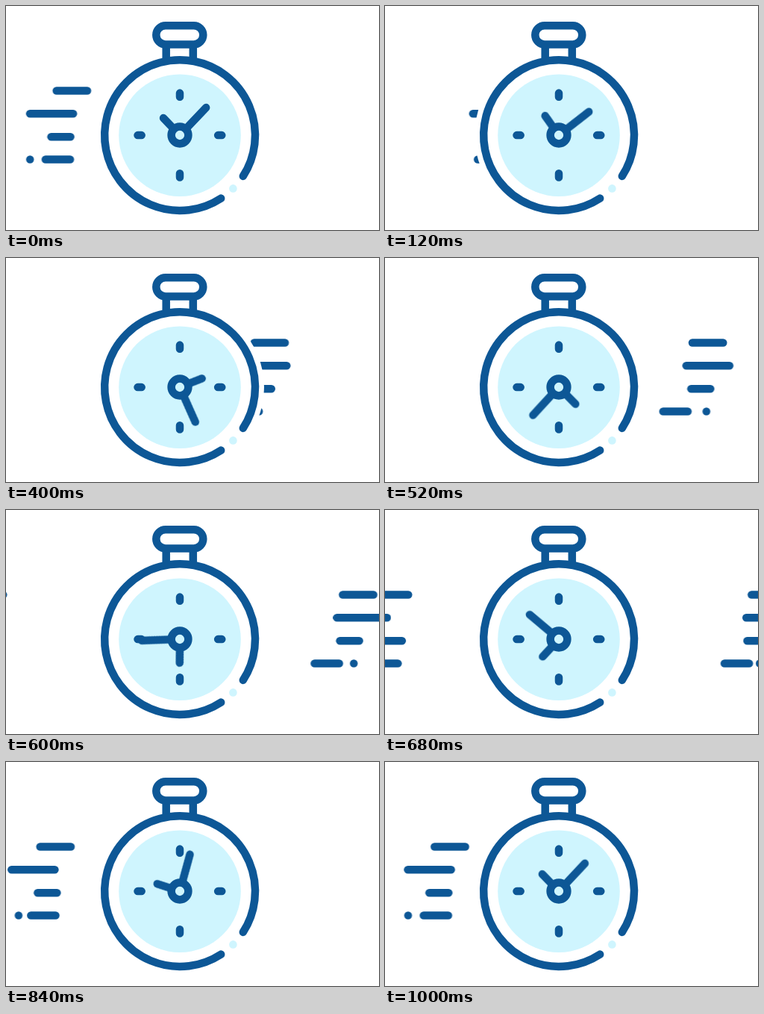
These frames come from a looping animation (500 by 300 pixels, 1.04 s). An HTML page:

```html
<!DOCTYPE html>
<html lang="en">
<head>
<meta charset="utf-8">
<title>Stopwatch</title>
<style>
  html, body { margin: 0; width: 100%; height: 100%; overflow: hidden; background: #fff; }
  svg { display: block; width: 500px; height: 300px; }
  .ink { fill: none; stroke: #0d5796; stroke-width: 10.5; stroke-linecap: round; }
  .pale { fill: #cff5fe; }

  .hands {
    transform-origin: 233px 173px;
    animation: turn 1040ms infinite;
  }
  @keyframes turn {
    0%, 2.1% { transform: rotate(0deg); animation-timing-function: cubic-bezier(.37, 0, .63, 1); }
    98.4%, 100% { transform: rotate(360deg); }
  }

  /* --mid: distance flown behind the watch, --out: drift off to the right, --in: approach from the left */
  .fly { animation: fly 1040ms infinite; }
  .enter { animation: enter 1040ms infinite; }
  @keyframes fly {
    0% { transform: translateX(0); animation-timing-function: linear; }
    50% { transform: translateX(var(--mid)); animation-timing-function: cubic-bezier(.39, .575, .565, 1); }
    100% { transform: translateX(calc(var(--mid) + var(--out))); }
  }
  @keyframes enter {
    0%, 50% { transform: translateX(calc(0px - var(--in))); animation-timing-function: cubic-bezier(.39, .575, .565, 1); }
    100% { transform: translateX(0); }
  }
  .r1 { --mid: 344.5px; --out: 168px; --in: 147px; }
  .r2 { --mid: 372px; --out: 170px; --in: 165px; }
  .r3 { --mid: 350px; --out: 159px; --in: 120px; }
  .r4 { --mid: 320px; --out: 174px; --in: 130px; }
  .dot { --mid: 399px; --out: 151px; --in: 100px; }
</style>
</head>
<body>
<svg viewBox="0 0 500 300" xmlns="http://www.w3.org/2000/svg">
  <defs>
    <path id="b1" d="M67 113.5H108.3"/>
    <path id="b2" d="M31.3 144.2H89.4"/>
    <path id="b3" d="M59.8 175.2H85.8"/>
    <path id="b4" d="M52.3 205.5H85.4"/>
    <path id="b5" d="M31.4 205.5h.01"/>
  </defs>

  <g class="ink">
    <g class="r1"><use href="#b1" class="fly"/><use href="#b1" class="enter"/></g>
    <g class="r2"><use href="#b2" class="fly"/><use href="#b2" class="enter"/></g>
    <g class="r3"><use href="#b3" class="fly"/><use href="#b3" class="enter"/></g>
    <g class="r4"><use href="#b4" class="fly"/><use href="#b4" class="enter"/></g>
    <g class="dot"><use href="#b5" class="fly"/><use href="#b5" class="enter"/></g>
  </g>

  <circle cx="233" cy="173" r="113" fill="#fff"/>
  <circle class="pale" cx="233" cy="173.2" r="81.8"/>
  <circle class="pale" cx="304.4" cy="244.4" r="5.3"/>

  <g class="ink">
    <path d="M214.7 52V71M250.8 52V71" stroke-linecap="butt"/>
    <rect x="201.3" y="26.2" width="63" height="25.2" rx="12.6"/>
    <path d="M317.8 227.9A100.9 100.9 0 1 0 288.2 257.6"/>
    <path d="M233 116.6V121.8M233 224.3V229.5M176.5 173.1H181.7M284.1 173.1H289.3"/>
    <g class="hands">
      <path d="M233 162V122" transform="rotate(43.6 233 173)"/>
      <path d="M233 162V141.2" transform="rotate(-43.7 233 173)"/>
    </g>
    <circle class="pale" cx="233" cy="173" r="11.4"/>
  </g>
</svg>
</body>
</html>
```
